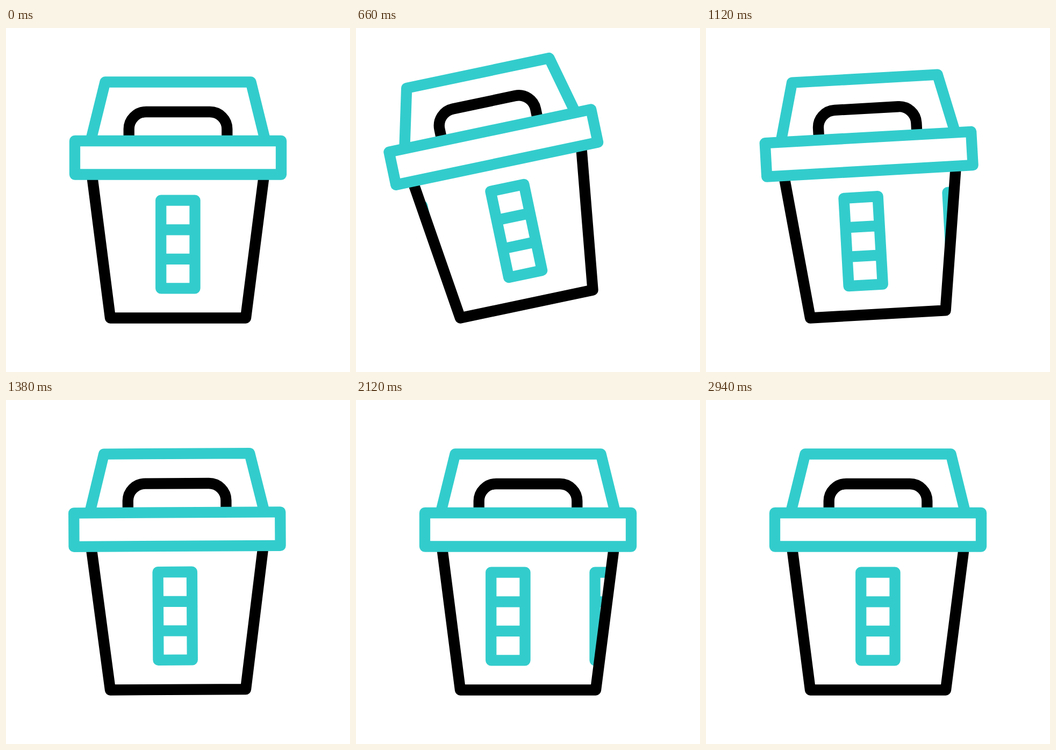
An HTML page for the animation above (3600 ms loop, 640 by 640 pixels).

```html
<!DOCTYPE html>
<html lang="en">
<head>
<meta charset="utf-8">
<title>Bin</title>
<style>
  html, body { margin: 0; width: 100%; height: 100%; overflow: hidden; background: #fff; }
  svg { display: block; width: 100vw; height: 100vh; }
  .line { fill: none; stroke-width: 20.3; stroke-linejoin: round; stroke-linecap: round; }
  .dark { stroke: #000; }
  .teal { stroke: #33cccc; }
</style>
</head>
<body>
<svg viewBox="0 0 640 640">
  <defs>
    <clipPath id="inside"><path d="M161 272 L194 539.5 H446 L479 272 Z"/></clipPath>
    <path id="label" class="line teal" d="M288.2 320.6 H351.5 V484.3 H288.2 Z M288.2 375.4 H351.5 M288.2 429.9 H351.5"/>
  </defs>
  <g id="bin">
    <g clip-path="url(#inside)">
      <g id="labels">
        <use href="#label" x="-193.3"/>
        <use href="#label"/>
        <use href="#label" x="193.3"/>
      </g>
    </g>
    <path class="line dark" d="M161 282 L194 539.5 H446 L479 282"/>
    <path class="line dark" d="M228.7 205 V188 A32 32 0 0 1 260.7 156 H379.3 A32 32 0 0 1 411.3 188 V205"/>
    <path class="line teal" d="M157.5 210 L184.5 100.5 H455.5 L482.5 210"/>
    <rect class="line teal" x="128" y="210" width="384" height="62.5" style="fill:#fff"/>
  </g>
</svg>
<script>
  const LOOP = 3600, STEP = 20, GAP = 193.3;

  // [ms, degrees to the left]
  const tilt = curve([
    [220, 0], [340, -2.4], [660, 11.9], [740, 14.3], [830, 16],
    [1120, 3.2], [1280, 0.75], [1480, 0.1], [1700, 0]
  ]);

  // [ms, distance the labels have turned to the right]
  const turn = curve([
    [220, 0], [500, 1], [660, 9.6], [1120, 173.9], [1280, 187], [1740, 192.8],
    [1800, GAP], [2120, 349.6], [2460, 499.9], [2900, 573], [2940, 3 * GAP]
  ]);

  // Smooth curve through the points that never overshoots them
  function curve(points) {
    const last = points.length - 1;
    const rate = i => (points[i + 1][1] - points[i][1]) / (points[i + 1][0] - points[i][0]);
    const slopes = points.map((_, i) => {
      if (i === 0 || i === last) return 0;
      const a = rate(i - 1), b = rate(i);
      return a * b > 0 ? 2 * a * b / (a + b) : 0;
    });
    return t => {
      if (t <= points[0][0]) return points[0][1];
      if (t >= points[last][0]) return points[last][1];
      const i = points.findIndex(p => p[0] > t) - 1;
      const [t0, y0] = points[i], [t1, y1] = points[i + 1];
      const span = t1 - t0, u = (t - t0) / span, v = 1 - u;
      return y0 * v * v * (1 + 2 * u) + y1 * u * u * (1 + 2 * v)
        + span * u * v * (slopes[i] * v - slopes[i + 1] * u);
    };
  }

  const bin = document.getElementById('bin');
  const labels = document.getElementById('labels');
  const start = performance.now();

  function draw() {
    const t = Math.floor((performance.now() - start) % LOOP / STEP) * STEP;
    const shift = turn(t) - GAP * Math.round(turn(t) / GAP);
    bin.setAttribute('transform', `rotate(${-tilt(t)} 194 539.5)`);
    labels.setAttribute('transform', `translate(${shift} 0)`);
    requestAnimationFrame(draw);
  }
  draw();
</script>
</body>
</html>
```
